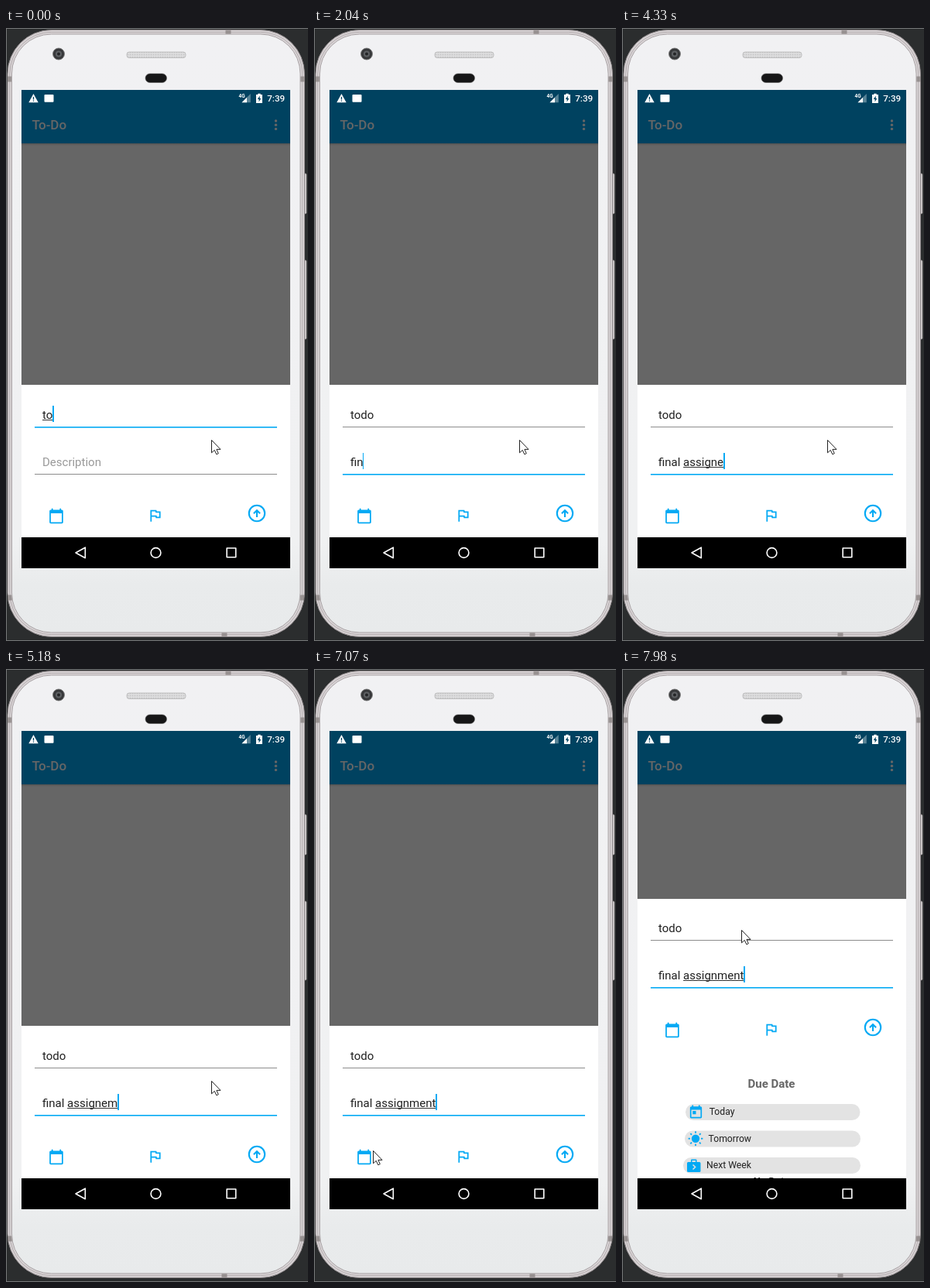
Animation of 390x792 px, one loop 8 s. Source, as an HTML page:

```html
<!DOCTYPE html>
<html lang="en">
<head>
<meta charset="utf-8">
<title>To-Do</title>
<style>
  html, body { margin: 0; width: 100%; height: 100%; overflow: hidden; background: #2b2d2e; }
  svg { display: block; width: 390px; height: 792px; }
  text { font-family: Roboto, sans-serif; white-space: pre; }
  .field { font-size: 15px; fill: #212121; }
  .chip { font-size: 12.2px; fill: #212121; }
  .accent { fill: #03a9f4; }
  .ring { fill: none; stroke: #03a9f4; stroke-width: 2.1; }
  .nav { fill: none; stroke: #fff; stroke-width: 1.6; stroke-linejoin: round; }
</style>
</head>
<body>
<svg viewBox="0 0 390 792" xmlns="http://www.w3.org/2000/svg">
  <defs>
    <linearGradient id="body" x1="0" y1="0" x2="0" y2="1">
      <stop offset="0" stop-color="#f1f1f3"/>
      <stop offset=".85" stop-color="#f0f1f2"/>
      <stop offset=".92" stop-color="#e9ebec"/>
      <stop offset="1" stop-color="#e8eaeb"/>
    </linearGradient>
    <linearGradient id="shade" x1="0" y1="0" x2="0" y2="1">
      <stop offset="0" stop-color="#3c3c3c" stop-opacity=".55"/>
      <stop offset="1" stop-color="#666" stop-opacity="0"/>
    </linearGradient>
    <pattern id="mesh" width="3" height="3" patternUnits="userSpaceOnUse">
      <rect width="3" height="3" fill="#dcdcdd"/>
      <circle cx="1.5" cy="1.5" r=".8" fill="#c3c3c4"/>
    </pattern>
    <clipPath id="screen"><rect x="20" y="80" width="347" height="578"/></clipPath>
  </defs>

  <!-- Phone body -->
  <rect width="390" height="792" fill="#2b2d2e"/>
  <path d="M0 .5H390M0 791.5H390M.5 0V792" stroke="#77797a"/>
  <g fill="#d5d1d2" stroke="#8d898a" stroke-width=".8">
    <rect x="383" y="188" width="5" height="52" rx="1.5"/>
    <rect x="383" y="300" width="5" height="102" rx="1.5"/>
  </g>
  <rect x="2" y="2.5" width="383.5" height="784" rx="57" fill="#d8d3d5" stroke="#8e888a"/>
  <rect x="4.8" y="5.3" width="378" height="778.4" rx="54" fill="none" stroke="#b4adaf"/>
  <path d="M2 66H8M379 66H385.500M2 736H8M379 736H385.500M287 3V8M282 781V786" stroke="#77716f" stroke-width="7" stroke-opacity=".6"/>
  <rect x="7.5" y="8" width="372.500" height="773" rx="51" fill="url(#body)" stroke="#a9a3a5"/>
  <circle cx="68" cy="33.500" r="7.500" fill="#38393b" stroke="#777" stroke-width=".8"/>
  <circle cx="68" cy="33.500" r="4" fill="#5e6063"/>
  <circle cx="68" cy="33.500" r="2" fill="#242527"/>
  <rect x="156" y="31" width="76" height="7.500" rx="3" fill="url(#mesh)" stroke="#b6b6b7" stroke-width=".8"/>
  <rect x="180" y="59" width="27.500" height="11.500" rx="5.700" fill="#161617" stroke="#555" stroke-width=".6"/>

  <!-- Dimmed app -->
  <rect x="20" y="80" width="347" height="578" fill="#666"/>
  <rect x="20" y="149" width="347" height="4" fill="url(#shade)"/>
  <rect x="20" y="80" width="347" height="69" fill="#004260"/>
  <text x="33.500" y="131" font-size="17" font-weight="500" fill="#666">To-Do</text>
  <g fill="#666">
    <circle cx="348.500" cy="120" r="1.700"/><circle cx="348.500" cy="125.200" r="1.700"/><circle cx="348.500" cy="130.400" r="1.700"/>
  </g>

  <!-- Status bar -->
  <g fill="#fff">
    <path d="M35.500 85L41.700 96.200H29.300Z"/>
    <path d="M35.500 89V92.500M35.500 93.500V94.800" stroke="#004260" stroke-width="1.300"/>
    <rect x="49.500" y="86" width="12" height="9.800" rx="1"/>
    <text x="300.500" y="90" font-size="6.500" font-weight="700">4G</text>
    <path d="M315.800 85V96.300H304.500Z" opacity=".35"/>
    <path d="M311 89.800V96.300H304.500Z"/>
    <path d="M325.300 84.800H328.700V86H331V97H323V86H325.300Z"/>
    <path d="M327.700 87.500L324.800 92H326.600V95.500L329.300 91H327.700Z" fill="#004260"/>
    <text x="337.200" y="95" font-size="11.700" font-weight="500">7:39</text>
  </g>

  <g clip-path="url(#screen)">
    <g id="sheet">
      <rect x="20" y="461" width="347" height="400" fill="#fff"/>
      <path class="accent" transform="translate(54.400 619.900) scale(.88)" d="M20 3h-1V1h-2v2H7V1H5v2H4c-1.100 0-2 .9-2 2v16c0 1.100.9 2 2 2h16c1.100 0 2-.9 2-2V5c0-1.100-.9-2-2-2zm0 18H4V8h16v13z"/>
      <path class="accent" transform="translate(182 619.200) scale(.88)" d="M12.360 6l.4 2H18v6h-3.360l-.4-2H7V6h5.360M14 4H5v17h2v-7h5.600l.4 2h7V6h-5.600L14 4z"/>
      <g class="ring">
        <circle cx="324" cy="627" r="10.200"/>
        <path d="M324 632V623.500M319.900 627.300L324 623.200L328.100 627.300"/>
      </g>
    </g>
    <g id="fields"></g>
    <g id="dates">
      <text x="193" y="541" font-size="15" font-weight="700" fill="#666" text-anchor="middle">Due Date</text>
      <g fill="#e3e3e3">
        <rect x="82" y="562" width="225.500" height="21" rx="10.500"/>
        <rect x="81" y="596.500" width="227" height="21" rx="10.500"/>
        <rect x="79" y="631" width="229" height="21" rx="10.500"/>
      </g>
      <path class="accent" transform="translate(85.300 562.600) scale(.85)" d="M19 3h-1V1h-2v2H8V1H6v2H5c-1.110 0-2 .9-2 2v14c0 1.100.89 2 2 2h14c1.100 0 2-.9 2-2V5c0-1.100-.9-2-2-2zm0 16H5V8h14v11zM7 10h5v5H7z"/>
      <circle class="accent" cx="95" cy="606.700" r="5.200"/>
      <g id="rays" class="accent"></g>
      <path class="accent" fill-rule="evenodd" d="M89 637V634.500Q89 633.500 90 633.500H95.500Q96.500 633.500 96.500 634.500V637H100Q101.500 637 101.500 638.500V648.500Q101.500 650 100 650H85.500Q84 650 84 648.500V638.500Q84 637 85.500 637ZM90.500 637H95V635H90.500Z"/>
      <path d="M91.500 640.500L94.600 643.500L91.500 646.500" fill="none" stroke="#e3e3e3" stroke-width="1.500"/>
      <text class="chip" x="112.700" y="576">Today</text>
      <text class="chip" x="111.500" y="611">Tomorrow</text>
      <text class="chip" x="109" y="645">Next Week</text>
      <text x="193" y="666" font-size="13" font-weight="700" fill="#222" text-anchor="middle">No Date</text>
    </g>
  </g>

  <!-- Navigation bar -->
  <rect x="20" y="658" width="347" height="40" fill="#000"/>
  <g class="nav">
    <path d="M90 678L102.300 671.200V684.800Z"/>
    <circle cx="193.500" cy="678" r="6.400"/>
    <rect x="285.200" y="672" width="11.600" height="11.800"/>
  </g>
  <path id="pointer" d="M0 0V16.300L3.800 12.900L6.300 18.300L8.800 17.200L6.400 11.900H11.500Z" fill="#fff" stroke="#222"/>
</svg>

<script>
const DURATION = 8000;
const LEFT = 47;
const SHEET_RISE = 164;
const FIELD_RISE = 165;
const byId = id => document.getElementById(id);
const ruler = document.createElement('canvas').getContext('2d');
ruler.font = '15px Roboto, sans-serif';
const endOf = text => LEFT + ruler.measureText(text).width;

// Each entry only lists what changes at that time.
const steps = [
  [0, { title: 'to', details: '', focus: 'title', mark: true, caret: 2, open: false }],
  [120, { title: 'tod' }],
  [260, { title: 'todo' }],
  [550, { focus: 'details', mark: false }],
  [1140, { caret: 0 }],
  [1650, { caret: 2 }],
  [1790, { details: 'f' }],
  [1920, { details: 'fi' }],
  [2040, { details: 'fin', caret: 1 }],
  [2180, { details: 'fina', caret: 2 }],
  [2320, { details: 'final' }],
  [2460, { mark: true }],
  [2600, { details: 'final ' }],
  [2750, { mark: false }],
  [3010, { caret: 0 }],
  [3410, { caret: 2 }],
  [3540, { details: 'final a', mark: true }],
  [3670, { details: 'final as' }],
  [3800, { details: 'final ass' }],
  [3930, { details: 'final assi' }],
  [4060, { details: 'final assig' }],
  [4200, { details: 'final assign' }],
  [4330, { details: 'final assigne' }],
  [4480, { details: 'final assignem' }],
  [5030, { caret: 0 }],
  [5170, { caret: 2 }],
  [5300, { details: 'final assigne' }],
  [5440, { details: 'final assign' }],
  [5590, { details: 'final assignm' }],
  [5730, { details: 'final assignme' }],
  [5870, { details: 'final assignmen', caret: 1 }],
  [5990, { details: 'final assignment', caret: 2, mark: false }],
  [6110, { mark: true }],
  [6530, { caret: 0 }],
  [7070, { caret: 2 }],
  [7470, { open: true }]
];

// Pointer position: time, x, y
const moves = [
  [0, 265, 532], [6660, 228, 552], [6800, 160, 586], [6940, 101, 613], [7070, 76, 622],
  [7590, 85, 590], [7720, 108, 505], [7850, 137, 400], [7980, 154, 337]
];

const box = (x, y, width, height, fill) =>
  `<rect x="${x}" y="${y}" width="${width}" height="${height}" fill="${fill}"/>`;

byId('rays').innerHTML = Array.from({ length: 8 }, (_, i) =>
  `<rect x="94.100" y="597.300" width="1.800" height="2.400" transform="rotate(${i * 45} 95 606.700)"/>`).join('');

function fieldMarkup(state, name, baseline, hint) {
  const text = state[name];
  const focused = state.focus === name;
  const lineTop = baseline + 10;
  let markup = focused ? box(37, lineTop, 313, 1.6, '#03a9f4') : box(37, lineTop, 313, 1, '#8c8c8c');
  markup += `<text class="field" x="${LEFT}" y="${baseline}"${text ? '' : ' style="fill:#999"'}>${text || hint}</text>`;
  if (focused && state.mark) {
    const start = endOf(text.slice(0, text.trimEnd().lastIndexOf(' ') + 1));
    markup += box(start, baseline + 1, endOf(text.trimEnd()) - start, 1, '#333');
  }
  if (focused && state.caret) {
    markup += box(Math.floor(endOf(text)), baseline - 17, state.caret, 21, '#03a9f4');
  }
  return markup;
}

let shown = '';
function draw(time) {
  const state = Object.assign({}, ...steps.filter(([at]) => at <= time).map(([, change]) => change));
  const key = JSON.stringify(state);
  if (key !== shown) {
    shown = key;
    byId('fields').innerHTML =
      fieldMarkup(state, 'title', 505, 'Title') + fieldMarkup(state, 'details', 566, 'Description');
    byId('fields').setAttribute('transform', `translate(0 ${state.open ? -FIELD_RISE : 0})`);
    byId('sheet').setAttribute('transform', `translate(0 ${state.open ? -SHEET_RISE : 0})`);
    byId('dates').setAttribute('visibility', state.open ? 'visible' : 'hidden');
  }
  const [, x, y] = moves.filter(([at]) => at <= time).pop();
  byId('pointer').setAttribute('transform', `translate(${x + .5} ${y + .5})`);
}

const begin = performance.now();
function tick() {
  draw((performance.now() - begin) % DURATION);
  requestAnimationFrame(tick);
}
tick();
</script>
</body>
</html>
```
